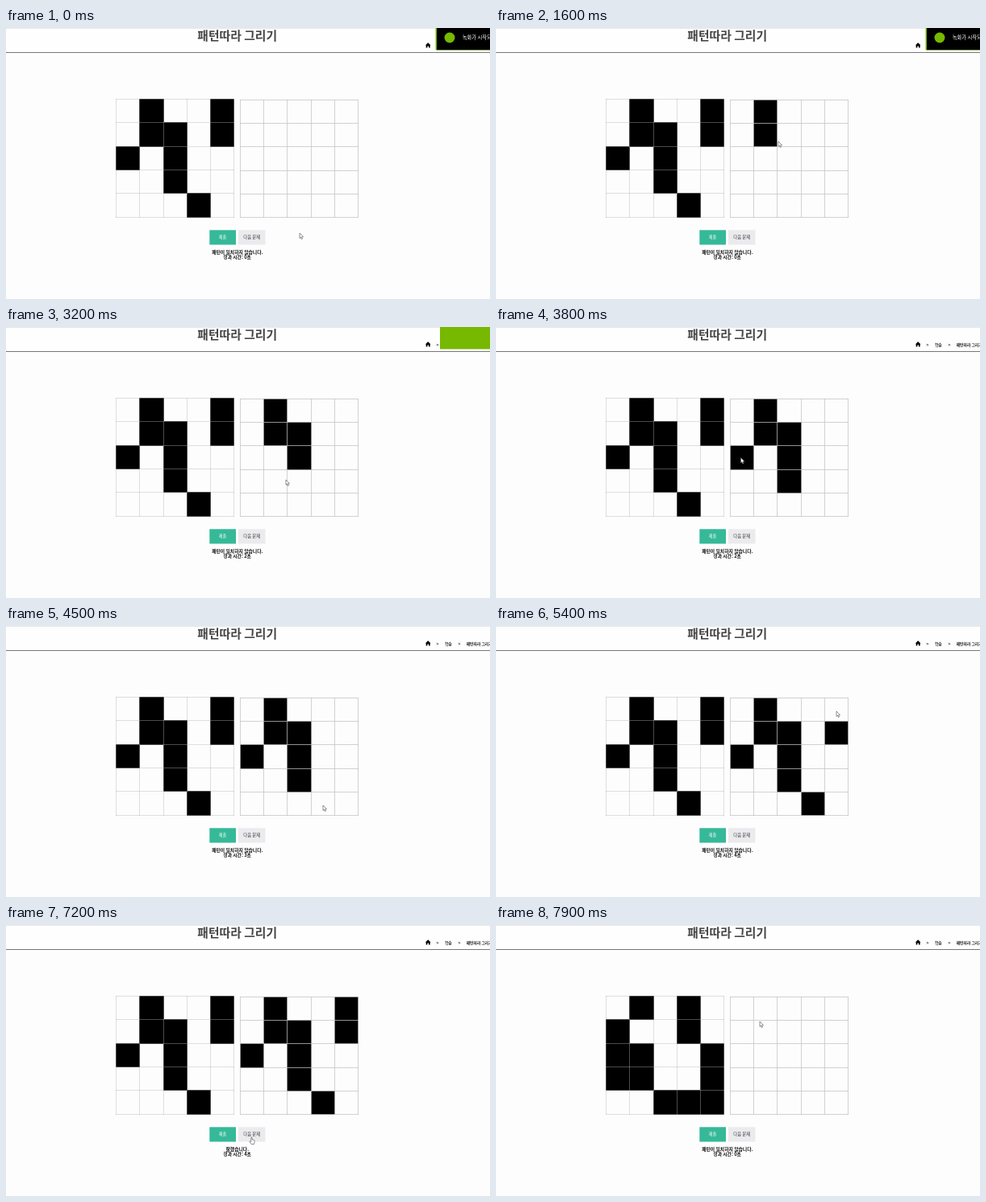
An HTML page with a canvas that plays this animation: 600 px wide and 337 px high, repeating every 8 s.

```html
<!DOCTYPE html>
<html lang="ko">
<head>
<meta charset="utf-8">
<title>패턴따라 그리기</title>
<style>
html, body { margin: 0; width: 100%; height: 100%; overflow: hidden; background: #fdfdfe; }
canvas { display: block; width: 600px; height: 337px; }
</style>
</head>
<body>
<canvas id="stage"></canvas>
<script>
const W = 600, H = 337, LOOP = 8000, STEP = 100;
const FONT = '"Noto Sans CJK KR", "Noto Sans CJK JP", "Noto Sans CJK", sans-serif';
const GREEN = '#76b900';
const CELL = 29.3, SUBMIT_AT = 6000, NEXT_AT = 7300;
const LEFT = { x: 136.4, y: 88.6, line: 'rgba(180, 180, 180, .42)' };
const RIGHT = { x: 290.3, y: 89.3, line: 'rgba(195, 195, 195, .75)' };

const canvas = document.getElementById('stage');
const ctx = canvas.getContext('2d');
const dpr = window.devicePixelRatio || 1;
canvas.width = Math.round(W * dpr);
canvas.height = Math.round(H * dpr);
ctx.scale(dpr, dpr);

const firstPattern = ['.#..#', '.##.#', '#.#..', '..#..', '...#.'];
const secondPattern = ['.#.#.', '#..#.', '##..#', '##..#', '..###'];

// Each move ends at time `at` after `took` ms; a press also fills its cell.
const hover = (at, took, x, y) => ({ at, took, x, y });
const press = (at, took, col, row) => ({
  at, took, col, row,
  x: RIGHT.x + (col + 0.45) * CELL,
  y: RIGHT.y + (row + 0.5) * CELL
});

const moves = [
  hover(0, 0, 364, 255),
  hover(200, 200, 341, 140),
  hover(800, 400, 334, 103),
  press(1200, 0, 1, 0),
  press(1400, 200, 1, 1),
  hover(1600, 100, 350, 141),
  press(1900, 300, 2, 1),
  press(2700, 200, 2, 2),
  hover(3200, 400, 347, 190),
  press(3300, 100, 2, 3),
  press(3800, 400, 0, 2),
  hover(4500, 400, 393, 223),
  press(4800, 100, 3, 4),
  press(5200, 300, 4, 1),
  hover(5400, 200, 422, 106),
  press(5500, 100, 4, 0),
  hover(SUBMIT_AT, 500, 271, 261),
  hover(7000, 500, 304, 264),
  hover(7900, 600, 327, 120)
];

const clamp = (v, lo, hi) => Math.max(lo, Math.min(hi, v));
const ease = k => k * k * (3 - 2 * k);

function pointerAt(t) {
  let { x, y } = moves[0];
  for (const m of moves) {
    const k = m.took ? ease(clamp((t - m.at + m.took) / m.took, 0, 1)) : +(t >= m.at);
    x += (m.x - x) * k;
    y += (m.y - y) * k;
  }
  return [x, y];
}

function box(x, y, w, h, color) {
  ctx.fillStyle = color;
  ctx.fillRect(x, y, w, h);
}

function label(str, x, y, size, color, weight = 400, align = 'center') {
  ctx.font = `${weight} ${size}px ${FONT}`;
  ctx.fillStyle = color;
  ctx.textAlign = align;
  ctx.fillText(str, x, y);
}

function shape(path, x, y, fill, stroke) {
  const p = new Path2D(path);
  ctx.save();
  ctx.translate(x, y);
  ctx.fillStyle = fill;
  ctx.fill(p);
  if (stroke) {
    ctx.strokeStyle = stroke;
    ctx.lineWidth = 0.65;
    ctx.lineJoin = 'round';
    ctx.stroke(p);
  }
  ctx.restore();
}

// Lines sit on whole pixels, so edges are rounded down before drawing.
function grid({ x, y, line }, filled) {
  const px = i => Math.floor(x + i * CELL);
  const py = i => Math.floor(y + i * CELL);
  for (let r = 0; r < 5; r++)
    for (let c = 0; c < 5; c++)
      if (filled(c, r))
        box(px(c), py(r), px(c + 1) - px(c) + 1, py(r + 1) - py(r) + 1, '#000');
  ctx.strokeStyle = line;
  ctx.lineWidth = 1;
  ctx.beginPath();
  for (let i = 0; i <= 5; i++) {
    ctx.moveTo(px(i) + 0.5, py(0));
    ctx.lineTo(px(i) + 0.5, py(5) + 1);
    ctx.moveTo(px(0), py(i) + 0.5);
    ctx.lineTo(px(5) + 1, py(i) + 0.5);
  }
  ctx.stroke();
}

function header() {
  box(0, 0, W, 30, '#fefefe');
  box(0, 0, W, 0.8, '#e2e2e2');
  box(0, 30, W, 1, '#777');
  label('패턴따라 그리기', 286.7, 15.3, 14.8, '#444', 700);
  shape('M0 0L3.3 3.3H2.5V6.3H.8V4.2H-.8V6.3H-2.5V3.3H-3.3Z', 523.2, 18.2, '#000');
  label('>', 535, 23.6, 5, '#222', 700);
  label('학습', 548.3, 23.6, 4.8, '#222', 700);
  label('>', 562, 23.6, 5, '#222', 700);
  label('패턴따라 그리기', 570.7, 23.6, 4.8, '#222', 700, 'left');
}

function notice(t) {
  if (t >= 3300) return;
  const slab = t < 3200 ? 532.5 : 538;
  box(slab, 0, W - slab, 27.5, GREEN);
  // the dark face slides off to the right before the green slab leaves
  const out = clamp((t - 2800) / 300, 0, 1);
  const face = 534 + 66 * out * out;
  ctx.save();
  ctx.beginPath();
  ctx.rect(face, 0, W - face, 27.5);
  ctx.clip();
  box(face, 0, W - face, 27.5, '#000');
  ctx.beginPath();
  ctx.arc(face + 16, 12, 6.5, 0, Math.PI * 2);
  ctx.fillStyle = GREEN;
  ctx.fill();
  label('녹화가 시작되었습니다.', face + 31.7, 14.2, 6.3, '#fff', 500, 'left');
  ctx.restore();
}

function footer(t) {
  box(252.3, 251.3, 32.7, 18.2, '#36b998');
  label('제출', 268.6, 262.4, 5.2, '#fff', 500);
  box(288, 251.3, 33.5, 18.2, '#ebebee');
  label('다음 문제', 304.7, 262.4, 5.3, '#333');
  const solved = t >= SUBMIT_AT && t < NEXT_AT;
  const secs = t < NEXT_AT ? clamp(Math.floor((t - 1100) / 1000), 0, 4) : 0;
  label(solved ? '잘했습니다.' : '패턴이 일치하지 않습니다.', 286.8, 281.3, 5.8, '#111', 700);
  label(`경과 시간: ${secs}초`, 286.6, 287.3, 5.8, '#111', 700);
}

function pointer(t) {
  const [x, y] = pointerAt(t);
  const onButton = y > 251 && y < 269.5 && (x > 252 && x < 285 || x > 288 && x < 321.5);
  const hand = 'M0 0L1 .2L1.2 3L3.8 3.6L4.2 4.6L3.6 8.5H0L-2 5.6L-1.5 4.8L-.3 5.6Z';
  const arrow = 'M0 0V6.4L1.4 5.2L2.4 7.5L3.5 7L2.5 4.8L4.5 4.7Z';
  shape(onButton ? hand : arrow, x, y, '#fff', '#555');
}

function draw(t) {
  box(0, 0, W, H, '#fdfdfe');
  header();
  const pattern = t < NEXT_AT ? firstPattern : secondPattern;
  grid(LEFT, (c, r) => pattern[r][c] === '#');
  grid(RIGHT, (c, r) => t < NEXT_AT && moves.some(m => t >= m.at && m.col === c && m.row === r));
  footer(t);
  notice(t);
  pointer(t);
}

const start = performance.now();
function tick() {
  const t = (performance.now() - start) % LOOP;
  draw(Math.floor(t / STEP) * STEP);
  requestAnimationFrame(tick);
}
tick();
</script>
</body>
</html>
```
